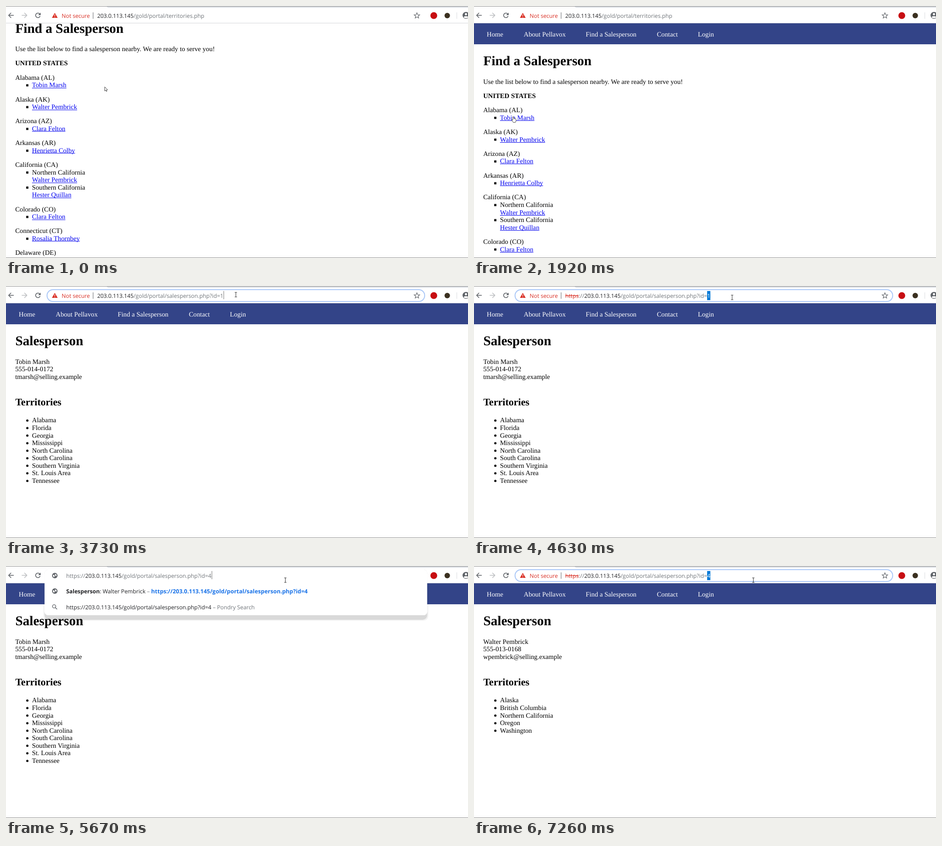
These frames come from a looping animation (1013x553 px, 8000 ms). An HTML page with a canvas:

```html
<!DOCTYPE html>
<html lang="en">
<head>
<meta charset="utf-8">
<title>Find a Salesperson</title>
<style>
  html, body { margin: 0; width: 100%; height: 100%; overflow: hidden; background: #fff; }
  canvas { display: block; }
</style>
</head>
<body>
<canvas id="stage" width="1013" height="553"></canvas>
<script>
const ctx = document.getElementById('stage').getContext('2d');
const W = 1013, H = 553, LOOP = 8000;
const LINE = 16.56, GAP = 14.72;
const SERIF = '"Liberation Serif", "Times New Roman", serif';
const SANS = '"Open Sans", "Noto Sans", sans-serif';
const body = '14.72px ' + SERIF, bodyBold = 'bold ' + body;
const h1 = 'bold 29.44px ' + SERIF, h2 = 'bold 22.08px ' + SERIF;
const ui = '12.25px ' + SANS, uiBold = 'bold ' + ui, linkBold = 'bold 12.5px ' + SANS;
const INK = '#202124', GREY = '#70757a', ICON = '#5f6368', RED = '#d93025', BLUE = '#1a73e8';

const HOST = '203.0.113.145', DIR = '/gold/portal/';
const DETAIL = DIR + 'salesperson.php?id=';
const LINK = 'https://' + HOST + DETAIL;

const people = {
  tobin: {
    name: 'Tobin Marsh', phone: '555-014-0172', mail: 'tmarsh@selling.example',
    areas: ['Alabama', 'Florida', 'Georgia', 'Mississippi', 'North Carolina',
      'South Carolina', 'Southern Virginia', 'St. Louis Area', 'Tennessee']
  },
  walter: {
    name: 'Walter Pembrick', phone: '555-013-0168', mail: 'wpembrick@selling.example',
    areas: ['Alaska', 'British Columbia', 'Northern California', 'Oregon', 'Washington']
  }
};
const states = [
  ['Alabama (AL)', ['Tobin Marsh']],
  ['Alaska (AK)', ['Walter Pembrick']],
  ['Arizona (AZ)', ['Clara Felton']],
  ['Arkansas (AR)', ['Henrietta Colby']],
  ['California (CA)', ['Walter Pembrick', 'Hester Quillan'], ['Northern California', 'Southern California']],
  ['Colorado (CO)', ['Clara Felton']],
  ['Connecticut (CT)', ['Rosalia Thornbey']],
  ['Delaware (DE)', []]
];
const nav = [['Home', 28], ['About Pellavox', 109], ['Find a Salesperson', 245], ['Contact', 401], ['Login', 491]];

const arrow = (x, y) => ({ cursor: drawArrow, x, y });
const hand = (x, y) => ({ cursor: drawHand, x, y });
const beam = (x, y) => ({ cursor: drawBeam, x, y });

// Each step overrides part of the state from its time on.
const steps = [
  [0, { scroll: 71.4, page: 'list', path: DIR + 'territories.php', id: '', chip: 1, scheme: false,
    focus: false, select: '', caret: false, loading: false, menu: '', fade: 1, ...arrow(216, 177) }],
  [120, { scroll: 0 }],
  [900, arrow(262, 141)],
  [1020, arrow(291, 103)],
  [1140, arrow(309, 74)],
  [1290, hand(306, 69)],
  [1560, hand(240, 128)],
  [1680, hand(120, 226)],
  [1800, hand(64, 265)],
  [1920, hand(82, 242)],
  [2340, { loading: true }],
  [2590, { path: DETAIL, id: '1', ...arrow(430, 181) }],
  [2740, { page: 'tobin', loading: false, ...arrow(451, 174) }],
  [2990, arrow(440, 165)],
  [3130, arrow(453, 120)],
  [3250, arrow(480, 64)],
  [3370, beam(502, 22)],
  [3490, { focus: true, select: 'all', ...beam(504, 19) }],
  [3610, { select: '', caret: true }],
  [3970, beam(508, 18.5)],
  [4110, { scheme: true, caret: false }],
  [4230, beam(510, 19)],
  [4480, beam(510.5, 19)],
  [4630, { select: 'last', ...beam(566, 25) }],
  [4750, beam(612.5, 31)],
  [5280, { id: '', select: '', caret: true, focus: false, menu: 'history', fade: .6 }],
  [5400, { fade: 1 }],
  [5670, { id: '4', menu: 'match' }],
  [6050, { menu: '', caret: false, chip: 0, loading: true }],
  [6200, { page: 'walter', chip: .9, scheme: false, loading: false }],
  [6350, { chip: 1 }],
  [7020, { focus: true, select: 'all' }],
  [7140, { scheme: true, select: '', caret: true }],
  [7260, { select: 'last', caret: false }]
];

function text(str, x, y, font, color = '#000') {
  ctx.font = font;
  ctx.fillStyle = color;
  ctx.fillText(str, x, y);
  return x + ctx.measureText(str).width;
}
function run(x, y, parts) {
  for (const [str, color, font = ui] of parts) x = text(str, x, y, font, color);
  return x;
}
function rect(x, y, w, h, color) {
  ctx.fillStyle = color;
  ctx.fillRect(x, y, w, h);
}
function disc(x, y, r, color) {
  ctx.fillStyle = color;
  ctx.beginPath();
  ctx.arc(x, y, r, 0, 7);
  ctx.fill();
}
function poly(points, { fill, stroke, width = 1, close = false }) {
  ctx.beginPath();
  points.forEach(([x, y]) => ctx.lineTo(x, y));
  if (close) ctx.closePath();
  if (fill) { ctx.fillStyle = fill; ctx.fill(); }
  if (stroke) { ctx.strokeStyle = stroke; ctx.lineWidth = width; ctx.stroke(); }
}
function at(x, y, draw) {
  ctx.save();
  ctx.translate(x, y);
  draw();
  ctx.restore();
}

function drawArrow() {
  poly([[.5, .5], [.5, 9.5], [2.6, 7.6], [4, 10.6], [5.4, 10], [4.1, 7], [6.8, 6.8]],
    { fill: '#fff', stroke: '#333', width: .9, close: true });
}
function drawHand() {
  poly([[3, 8.5], [3, 1.5], [4, .6], [5, 1.5], [5, 5], [8, 5.3], [10.2, 6.3], [10.2, 10], [8.8, 13.4],
    [4, 13.4], [.6, 8.6], [1.3, 7.4]], { fill: '#fff', stroke: '#333', width: .9, close: true });
}
function drawBeam() {
  const ink = { stroke: '#333' };
  poly([[0, -5], [0, 5]], ink);
  poly([[-2.5, -5], [2.5, -5]], ink);
  poly([[-2.5, 5], [2.5, 5]], ink);
}

function drawNav() {
  rect(0, 38, W, 46, '#334488');
  for (const [label, x] of nav) text(label, x, 67, body, '#fff');
}

function drawList() {
  text('Find a Salesperson', 20.5, 130.2, h1);
  text('Use the list below to find a salesperson nearby. We are ready to serve you!', 20.2, 170.5, body);
  text('UNITED STATES', 20.2, 201.8, bodyBold);
  let y = 233.1;
  const link = name => {
    const end = text(name, 57, y, body, '#0000ee');
    rect(57, Math.round(y + 1), end - 57, 1, '#0000ee');
    y += LINE;
  };
  for (const [state, names, regions] of states) {
    text(state, 20.2, y, body);
    y += LINE;
    names.forEach((name, i) => {
      rect(44.3, y - 6.6, 4.8, 4.8, '#000');
      if (regions) {
        text(regions[i], 57, y, body);
        y += LINE;
      }
      link(name);
    });
    y += GAP;
  }
}

function drawPerson({ name, phone, mail, areas }) {
  text('Salesperson', 20.5, 130.2, h1);
  [name, phone, mail].forEach((row, i) => text(row, 20.2, 170.5 + i * LINE, body));
  text('Territories', 20.4, 262.4, h2);
  areas.forEach((area, i) => {
    const y = 299.4 + i * LINE;
    disc(46.8, y - 4.2, 2.5, '#000');
    text(area, 57, y, body);
  });
}

function drawGlobe(y) {
  disc(107, y, 6, ICON);
  poly([[103, y - 2], [106, y - 1], [107, y + 1], [105, y + 4], [103, y + 1]], { fill: '#fff' });
  poly([[107, y - 4], [111, y - 2], [110, y + 2], [108, y]], { fill: '#fff' });
}
function drawLens(y) {
  ctx.strokeStyle = ICON;
  ctx.lineWidth = 1.4;
  ctx.beginPath();
  ctx.arc(105.5, y - 1.5, 3.6, 0, 7);
  ctx.stroke();
  poly([[108.2, y + 1.2], [112, y + 5]], { stroke: ICON, width: 1.6 });
}

function drawReload(loading) {
  const ink = { stroke: ICON, width: 1.7 };
  if (loading) {
    poly([[65.5, 15.5], [75, 25]], ink);
    poly([[75, 15.5], [65.5, 25]], ink);
    return;
  }
  ctx.strokeStyle = ICON;
  ctx.lineWidth = 1.7;
  ctx.beginPath();
  ctx.arc(70, 20.5, 5, .3, 5.5);
  ctx.stroke();
  poly([[76, 14.5], [76, 20], [70.5, 20]], { fill: ICON });
}

function drawToolbar(s) {
  rect(0, 0, W, 38, '#fff');
  ctx.fillStyle = '#dee1e6';
  ctx.beginPath();
  ctx.roundRect(221, 0, W - 221, 4, [0, 0, 0, 4]);
  ctx.fill();
  rect(0, 0, W, 1, '#8a8a8a');
  rect(0, 37, W, 1, '#d4d6d9');

  for (const [x, dir, color] of [[5, 1, ICON], [46.5, -1, '#bcbec1']]) {
    const ink = { stroke: color, width: 1.6 };
    poly([[x + dir, 20.5], [x + 12 * dir, 20.5]], ink);
    poly([[x + 6.2 * dir, 15], [x + .8 * dir, 20.5], [x + 6.2 * dir, 26]], ink);
  }
  drawReload(s.loading);

  disc(938, 21, 7.5, '#c70d12');
  disc(967.5, 21, 6, '#3b3020');
  rect(988, 14, 1, 14, '#dadce0');
  disc(1008.5, 20.5, 7.5, ICON);
  disc(1008.5, 18, 2.4, '#fff');
  ctx.beginPath();
  ctx.ellipse(1008.5, 24.5, 4.6, 2.2, 0, 0, 7);
  ctx.fill();

  if (s.focus) {
    ctx.strokeStyle = '#a9c7f7';
    ctx.lineWidth = 2;
    ctx.beginPath();
    ctx.roundRect(90, 8, 828, 26, 13);
    ctx.stroke();
  }
  if (!s.menu) {
    const star = Array.from({ length: 10 }, (_, i) => {
      const r = i % 2 ? 2.8 : 6.4, a = i * Math.PI / 5 - Math.PI / 2;
      return [901 + r * Math.cos(a), 21.3 + r * Math.sin(a)];
    });
    poly(star, { stroke: ICON, width: 1.2, close: true });
  }
}

function drawChip(amount) {
  poly([[107, 15], [113.3, 26], [100.7, 26]], { fill: RED });
  rect(106.4, 18.5, 1.2, 4, '#fff');
  rect(106.4, 23.6, 1.2, 1.2, '#fff');
  ctx.save();
  ctx.beginPath();
  ctx.rect(122, 8, 63 * amount, 28);
  ctx.clip();
  text('Not secure', 122, 25.5, ui, RED);
  ctx.restore();
  rect(122 + 68.5 * amount, 14, 1, 14, ICON);
}

function drawAddress(s) {
  const chip = s.menu ? 0 : s.chip;
  if (chip) drawChip(chip); else drawGlobe(21);
  const x = chip ? 122 + 78 * chip : 132, y = 25.5;
  const all = s.select === 'all';
  const tint = color => all ? '#fff' : color;
  const parts = [];
  if (s.scheme) parts.push(['https', tint(chip ? RED : GREY)], ['://', tint(GREY)]);
  parts.push([HOST, tint(INK)], [s.path, tint(GREY)]);

  ctx.font = ui;
  const width = str => ctx.measureText(str).width;
  const idX = parts.reduce((sum, [str]) => sum + width(str), x), end = idX + width(s.id);
  if (s.select) {
    const from = all ? x : idX;
    rect(from, 11, end - from, 20, '#0078d7');
  }
  run(x, y, [...parts, [s.id, s.select ? '#fff' : GREY]]);
  if (s.scheme && chip) rect(x, 21, width('https'), 1, tint(RED));
  if (s.caret) rect(Math.round(end + .5), 11, 1, 18, '#777');
}

const hit = (name, tail) => [['Salesperson', INK, uiBold], [': ' + name, INK], [' – ', GREY],
  [LINK, BLUE, linkBold], ...tail];
const search = id => [[LINK + id, INK], [' – Pondry Search', GREY]];
const menus = {
  history: [
    [[LINK, '#1558d0', linkBold]],
    search(''),
    hit('Walter Pembrick', [['4', BLUE]]),
    hit('Henrietta Colby', [['6', BLUE]]),
    hit('Tobin Marsh', [['%27 OR SLEEP(0)=0--%27', BLUE]]),
    hit('Tobin Marsh', [['id=%27 OR SLEEP(5)=0--%27', BLUE]])
  ],
  match: [hit('Walter Pembrick', [['4', BLUE, linkBold]]), search('4')]
};

function drawMenu(rows, fade) {
  const bottom = 38 + rows.length * 35;
  const panel = () => ctx.roundRect(84.5, 8, 839, bottom - 8, 8);
  ctx.fillStyle = 'rgba(0,0,0,.1)';
  ctx.beginPath();
  ctx.roundRect(84.5, 8, 839, bottom + 2, 10);
  panel();
  ctx.fill('evenodd');
  if (fade === 1) {
    ctx.fillStyle = 'rgba(0,0,0,.05)';
    ctx.beginPath();
    ctx.roundRect(82, 38, 844, bottom - 26, [0, 0, 10, 10]);
    panel();
    ctx.fill('evenodd');
  }
  ctx.save();
  ctx.globalAlpha = fade;
  ctx.fillStyle = '#fff';
  ctx.beginPath();
  panel();
  ctx.fill();
  rows.forEach((parts, i) => {
    const y = 55 + i * 35;
    // The selected first row stays solid while the rest fades in.
    ctx.globalAlpha = i ? Math.min(1, fade + .06) : 1;
    (i === 1 ? drawLens : drawGlobe)(y);
    run(132, y + 4.5, parts);
  });
  ctx.restore();
}

function draw(time) {
  const s = {};
  for (const [start, change] of steps) if (start <= time) Object.assign(s, change);

  rect(0, 0, W, H, '#fff');
  at(0, -s.scroll, () => {
    drawNav();
    if (s.page === 'list') drawList(); else drawPerson(people[s.page]);
  });
  drawToolbar(s);
  if (s.menu) drawMenu(menus[s.menu], s.fade);
  drawAddress(s);
  rect(0, 552, W, 1, '#8a8a8a');
  at(s.x, s.y, s.cursor);
}

ctx.textRendering = 'geometricPrecision';
const begin = performance.now();
function tick() {
  draw((performance.now() - begin) % LOOP);
  requestAnimationFrame(tick);
}
tick();
</script>
</body>
</html>
```
